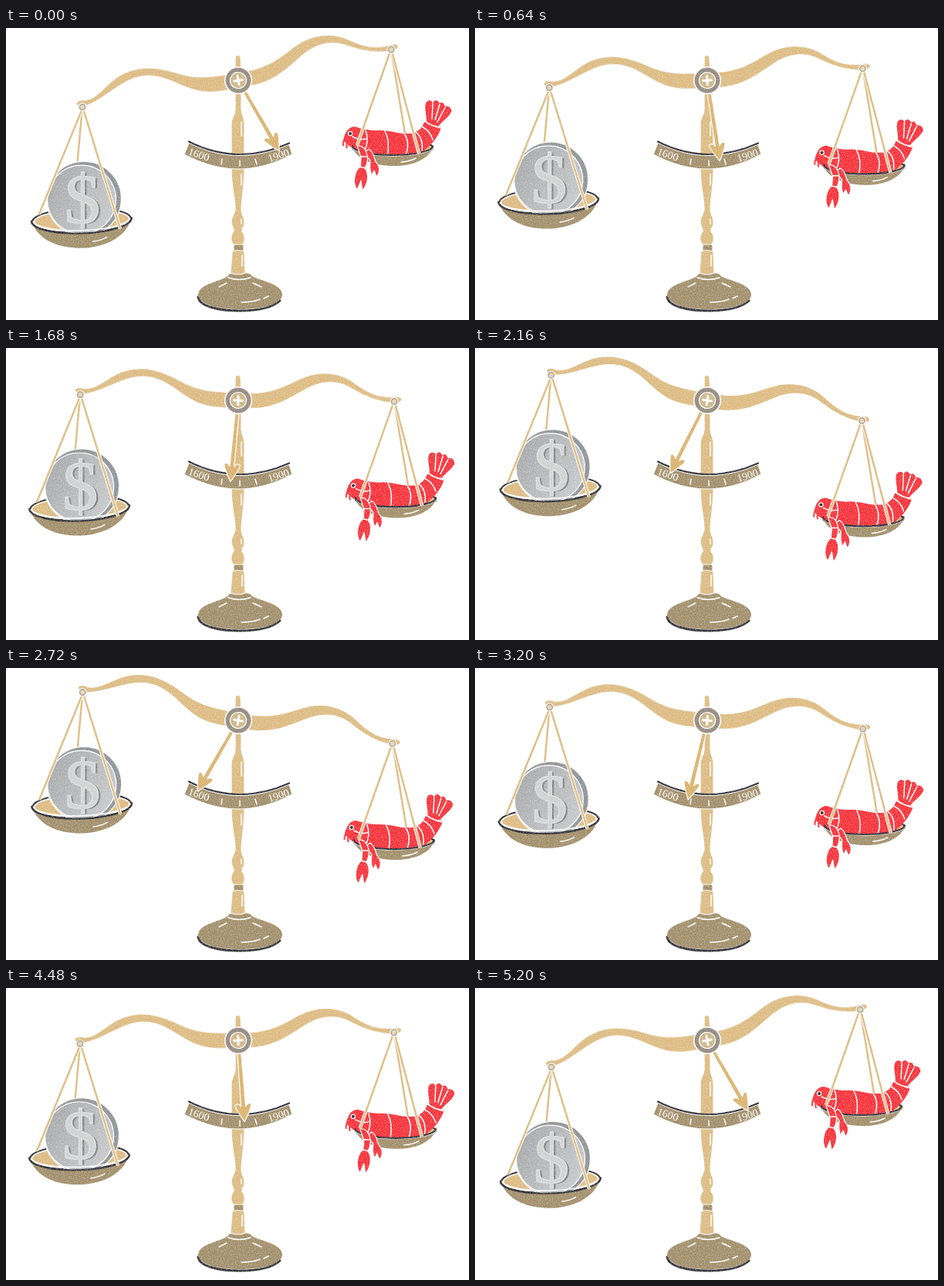
Animation of 600x379 px, one loop 5440 ms. Source, as an HTML page:

```html
<!DOCTYPE html>
<html lang="en">
<head>
<meta charset="utf-8">
<title>Scales</title>
<style>
  html, body { margin: 0; width: 100%; height: 100%; overflow: hidden; background: #fff; }
  svg { display: block; width: 100vw; height: 100vh; }
  .tan { fill: #dcba80; }
  .brass { fill: #a08d68; }
  .red { fill: #f62f37; }
  .edge { stroke: #fff; stroke-width: 1.2; stroke-linejoin: round; }
  .white { fill: none; stroke: #fff; stroke-width: 1.5; stroke-linecap: round; }
  .dark { fill: none; stroke: #2d2d34; stroke-width: 2.2; stroke-linecap: round; }
  .heavy { stroke-width: 3; }
  .rope-edge { fill: none; stroke: #fff; stroke-width: 4.4; }
  .rope { fill: none; stroke: #dcba80; stroke-width: 2.5; stroke-linecap: round; }
  text { font-family: "Liberation Serif", "Noto Serif", serif; text-anchor: middle; }
</style>
</head>
<body>
<svg viewBox="0 0 600 379">
  <defs>
    <filter id="grain" filterUnits="userSpaceOnUse" x="0" y="0" width="600" height="379" color-interpolation-filters="sRGB">
      <feTurbulence type="fractalNoise" baseFrequency="0.7" numOctaves="2" seed="4"/>
      <feColorMatrix values="0 0 0 0 1  0 0 0 0 1  0 0 0 0 1  0.9 0 0 0 -0.38"/>
      <feComposite operator="atop" in2="SourceGraphic"/>
    </filter>
    <linearGradient id="silver" x1="0" y1="0" x2="1" y2=".6">
      <stop offset="0" stop-color="#a0a2a3"/>
      <stop offset=".5" stop-color="#b3b5b6"/>
      <stop offset="1" stop-color="#c4c6c7"/>
    </linearGradient>
  </defs>

  <g filter="url(#grain)">
    <!-- base -->
    <path class="dark heavy" d="M249 349C250 361 275 367 303 367C326 367 345 363 355 354"/>
    <path class="brass" d="M289 320C291 317 314 317 317 320C320 327 358 330 358 346C358 358 333 365 303 365C273 365 250 359 249 346C249 331 286 328 289 320Z"/>
    <path class="white" d="M288 324Q302 329 317 324M305 356Q320 356 329 352M334 351L340 348M320 331L331 336M286 331L276 336"/>

    <!-- post -->
    <path class="tan edge" d="M297 39C297 34 304 34 304 39L305 58V106C305 113 309 116 309 124V184C309 205 305 222 305 236C305 243 310 245 309 254C308 260 305 261 306 264C311 269 310 280 305 282H296C291 279 290 270 295 264C296 260 292 258 292 252C292 245 296 242 297 236C297 220 292 205 292 184V124C292 116 297 113 297 106V58Z"/>
    <rect class="brass edge" x="295" y="281" width="13" height="10" rx="2"/>
    <path class="tan edge" d="M293 290Q301 287 309 290L310 318Q301 322 291 318Z"/>
    <path class="white" d="M305 122V140M305 190V204M305 248V254M306 295V309"/>

    <!-- dial -->
    <path class="brass edge" d="M237 149Q301 181 367 151L371 164Q301 202 231 164Z"/>
    <path class="dark" d="M237 147.500Q301 179.500 367 149.500"/>
    <path class="white" d="M280 170L279 177M303 172V179M323 170L325 177"/>
    <g fill="#fff" font-size="14">
      <text transform="translate(248.500 168.500) rotate(18)">1600</text>
      <text transform="translate(354.500 170) rotate(-18)">1900</text>
    </g>

    <g id="beam">
      <path class="tan edge" d="M-212 -6C-212 -10 -205 -11 -199 -9C-182 -9 -168 -27 -150 -33C-122 -43 -97 -34 -76 -23C-55 -12 -40 -11 -14 -10H14C45 -11 60 -21 80 -31C105 -43 132 -41 152 -26C172 -12 186 -10 200 -11C206 -11 211 -13 212 -8C212 -4 206 -3 200 -3C180 -4 164 -10 148 -19C130 -30 112 -30 92 -20C70 -8 50 10 14 10H-14C-45 11 -58 4 -76 -8C-100 -25 -118 -32 -145 -23C-165 -16 -182 -4 -199 -2C-206 -1 -211 -2 -212 -6Z"/>
    </g>

    <g id="coinPan">
      <path class="rope-edge" d="M0 0L-7 78"/>
      <path class="rope" d="M0 0L-7 78"/>
      <g transform="rotate(-2 0 146)">
        <ellipse class="tan" cx="-1" cy="147" rx="64" ry="16" stroke="#2d2d34" stroke-width="2.2"/>
        <ellipse class="white" cx="-1" cy="147" rx="61.500" ry="14"/>
      </g>
      <circle class="edge" cx="2" cy="119" r="48.500" fill="#8f9294"/>
      <circle class="edge" cx="-1" cy="120" r="44.500" fill="url(#silver)"/>
      <g font-size="92" transform="translate(0 150)">
        <text x="3" y="1" fill="#7f8284">$</text>
        <text fill="#cfd1d1" stroke="#dcdddd" stroke-width="1.6">$</text>
      </g>
      <g transform="translate(-1 1) rotate(-2 0 146)">
        <path class="brass" d="M-64 147A64 16 0 0 0 64 147C55 173 24 182 0 182C-27 182 -56 172 -64 147Z"/>
        <path class="white" d="M-63 146A64 16 0 0 0 63 146"/>
        <path class="dark" d="M-65 145A65 18 0 0 0 65 145"/>
        <path class="white" d="M14 174Q25 173 32 169"/>
      </g>
      <path class="rope-edge" d="M0 2L-56 139M1 2L49 158"/>
      <path class="rope" d="M0 2L-56 139M1 2L49 158"/>
    </g>

    <g id="lobsterPan">
      <path class="rope-edge" d="M0 0L18 109"/>
      <path class="rope" d="M0 0L18 109"/>
      <ellipse class="tan" cx="2" cy="127" rx="52" ry="10" stroke="#2d2d34" stroke-width="2.2"/>
      <!-- lobster body and tail -->
      <path class="red" d="M-62 117C-59 105 -54 100 -47 100C-36 104 -26 105 -18 105C-4 104 6 109 18 109C31 110 39 105 43 94L65 101C61 113 53 123 42 132L36 137H-38C-47 128 -58 125 -62 117Z"/>
      <path class="red edge" d="M45 94C46 84 41 74 45 68Q50 63 54 68Q58 62 63 69Q68 66 70 73Q78 72 79 80C76 89 67 92 62 100Q53 100 45 94Z"/>
      <path class="white" d="M-33 105Q-28 119 -35 132M-8 106Q-1 119 -5 138M17 109Q25 121 19 137M32 107Q42 115 40 131M40 100Q51 106 54 117M44 93Q54 100 65 102M54 69L53 90M63 71L57 91M70 75L60 94M-50 113Q-39 119 -31 115"/>
      <circle class="edge" cx="-53" cy="109" r="2.600" fill="#222"/>
      <path d="M-60 117Q-63 120 -62 125M-56 120Q-59 123 -57 128" fill="none" stroke="#f62f37" stroke-width="2"/>
      <!-- bowl -->
      <path class="brass" d="M-50 128A52 11 0 0 0 54 127C48 144 25 151 5 151C-20 151 -43 144 -50 128Z"/>
      <path class="white" d="M-50 127A52 11 0 0 0 54 126"/>
      <path class="dark" d="M-50 125A52 12 0 0 0 54 125"/>
      <path class="white" d="M13 146Q25 145 32 141"/>
      <!-- claws -->
      <path class="red edge" d="M-29 129C-20 135 -23 144 -18 148C-14 154 -15 161 -19 165L-22 157L-25 163C-29 156 -27 149 -27 144L-35 134Z"/>
      <path class="red edge" d="M-44 125C-33 124 -28 138 -32 150L-34 154C-28 161 -30 175 -37 183L-39 170L-44 182C-51 173 -47 157 -40 152L-39 140Z"/>
      <path class="white" d="M-41 152L-33 154M-39 139L-32 139"/>
      <path class="rope-edge" d="M-1 2L-44 124M1 2L36 135"/>
      <path class="rope" d="M-1 2L-44 124M1 2L36 135"/>
    </g>

    <g fill="#e5d3b0" stroke="#a59a8b" stroke-width="1.5">
      <g class="hook"><circle r="5.500" fill="#fff" stroke="none"/><circle r="3.700"/></g>
      <g class="hook"><circle r="5.500" fill="#fff" stroke="none"/><circle r="3.700"/></g>
    </g>

    <g id="needle">
      <path class="edge" d="M-2.500 14H2.500L3 86Q7 80 10.500 84Q9 91 0 106Q-9 91 -10.500 84Q-7 80 -3 86Z" fill="#d9b16b"/>
    </g>
    <g id="hub">
      <circle r="18" fill="#fff"/>
      <circle r="16.500" fill="#91887e"/>
      <circle class="edge" r="10.500" fill="#cdb486"/>
      <path class="white heavy" d="M-5.500 0H5.500M0 -5.500V5.500"/>
    </g>
  </g>
</svg>
<script>
  const LOOP = 5440, STEP = 80, PIVOT = { x: 301, y: 68 };
  const LEFT = { x: -205, y: -1 }, RIGHT = { x: 202, y: -5 };

  // Needle swings: start, halfway and end times (ms), then angles in degrees.
  const swings = [
    [0, 520, 1120, 30, 0],
    [1280, 1870, 2480, 0, -30],
    [2640, 3170, 3920, -30, 0],
    [4080, 4720, 5200, 0, 30]
  ];

  const byId = id => document.getElementById(id);
  const hooks = document.querySelectorAll('.hook');
  const place = (el, x, y, turn = 0) =>
    el.setAttribute('transform', `translate(${x} ${y}) rotate(${turn})`);

  function progress(t, start, mid, end) {
    if (t >= end) return 1;
    return t < mid
      ? 0.5 * ((t - start) / (mid - start)) ** 2.6
      : 1 - 0.5 * ((end - t) / (end - mid)) ** 2.4;
  }

  function needleAngle(t) {
    const [start, mid, end, from, to] = swings.findLast(s => t >= s[0]);
    return from + (to - from) * progress(t, start, mid, end);
  }

  function rotated(p, degrees) {
    const a = degrees * Math.PI / 180, c = Math.cos(a), s = Math.sin(a);
    return [PIVOT.x + p.x * c - p.y * s, PIVOT.y + p.x * s + p.y * c];
  }

  function draw(t) {
    const angle = needleAngle(t), tilt = -angle / 3;
    const left = rotated(LEFT, tilt), right = rotated(RIGHT, tilt);
    place(byId('beam'), PIVOT.x, PIVOT.y, tilt);
    place(byId('hub'), PIVOT.x, PIVOT.y, tilt);
    place(byId('needle'), PIVOT.x, PIVOT.y, -angle);
    place(byId('coinPan'), ...left);
    place(byId('lobsterPan'), ...right);
    place(hooks[0], ...left);
    place(hooks[1], ...right);
  }

  const origin = performance.now();
  let shown = -1;
  function tick() {
    const t = Math.floor((performance.now() - origin) % LOOP / STEP) * STEP;
    if (t !== shown) draw(shown = t);
    requestAnimationFrame(tick);
  }
  tick();
</script>
</body>
</html>
```
